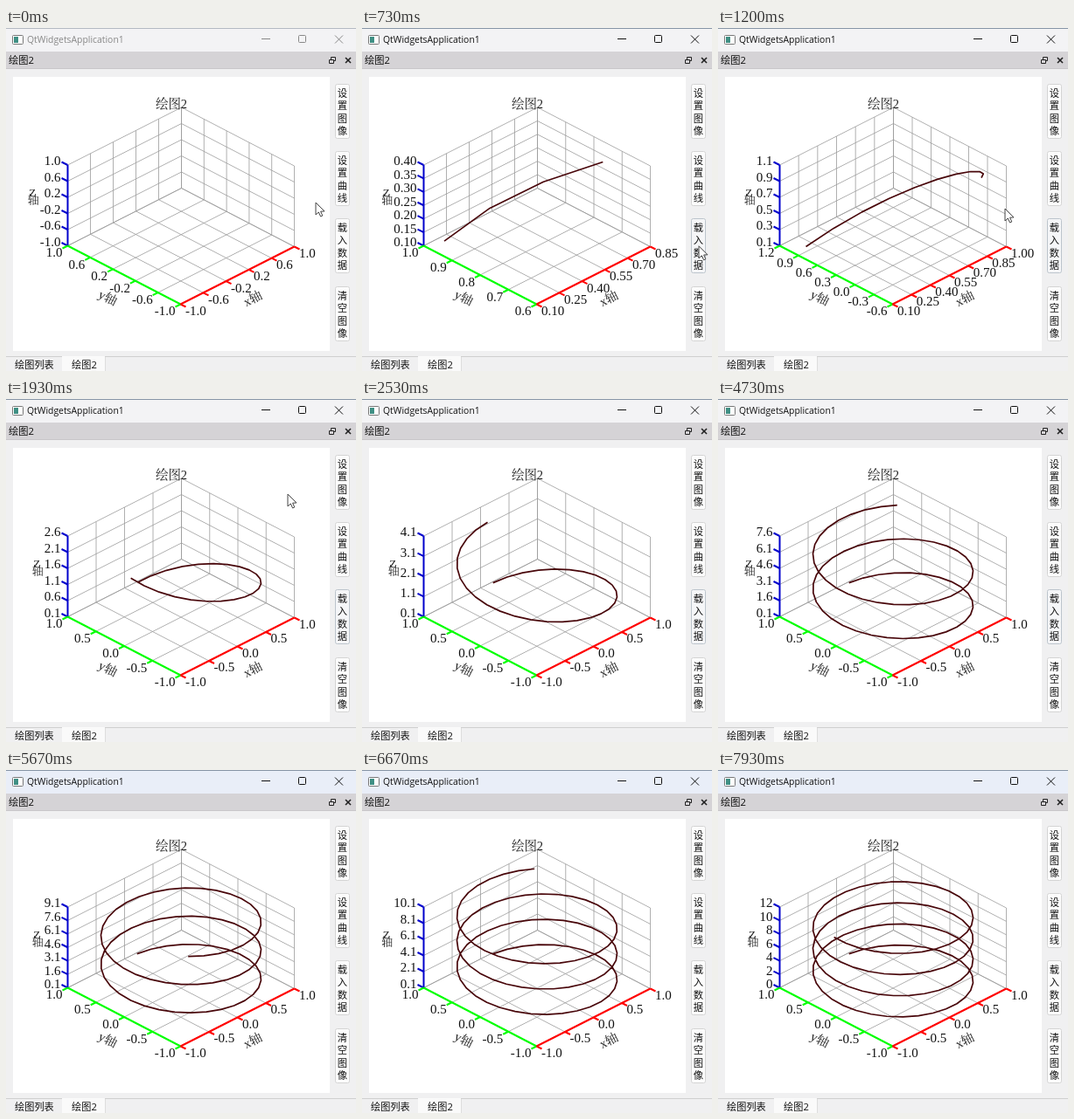
Write an HTML page with a canvas that moves like this. It is 400x393 px and loops after 8000 ms.

```html
<!DOCTYPE html>
<html lang="zh">
<head>
<meta charset="utf-8">
<style>
html, body { margin: 0; width: 100%; height: 100%; overflow: hidden; background: #f0f0f1; }
canvas { display: block; width: 400px; height: 393px; }
</style>
</head>
<body>
<canvas id="stage"></canvas>
<script>
const LOOP = 8000, FRAME = 1000 / 15;
const UI = '"Open Sans", "Noto Sans CJK SC", "Noto Sans CJK", sans-serif';
const SERIF = '"Liberation Serif", "Noto Serif CJK SC", "Noto Sans CJK SC", "Noto Sans CJK", serif';
const canvas = document.getElementById('stage');
const ctx = canvas.getContext('2d');
const dpr = window.devicePixelRatio || 1;
canvas.width = 400 * dpr;
canvas.height = 393 * dpr;

function rect(x, y, w, h, color) {
  ctx.fillStyle = color;
  ctx.fillRect(x, y, w, h);
}

function line(points, color, width = 1) {
  ctx.beginPath();
  points.forEach(p => ctx.lineTo(p[0], p[1]));
  ctx.strokeStyle = color;
  ctx.lineWidth = width;
  ctx.stroke();
}

function text(str, x, y, size, { font = UI, align = 'left', color = '#111', turn = 0 } = {}) {
  ctx.save();
  ctx.translate(x, y);
  ctx.rotate(turn);
  ctx.font = `${size}px ${font}`;
  ctx.textAlign = align;
  ctx.textBaseline = 'middle';
  ctx.fillStyle = color;
  ctx.fillText(str, 0, 0);
  ctx.restore();
}

function box(x, y, w, h, r, fill, stroke) {
  ctx.beginPath();
  ctx.roundRect(x + .5, y + .5, w - 1, h - 1, r);
  ctx.fillStyle = fill;
  ctx.fill();
  ctx.strokeStyle = stroke;
  ctx.lineWidth = 1;
  ctx.stroke();
}

function cross(x, y, r, color, width) {
  line([[x - r, y - r], [x + r, y + r]], color, width);
  line([[x - r, y + r], [x + r, y - r]], color, width);
}

// Fractions along the x, y and z axes to screen
const project = (u, v, w) => [199.5 + 130 * u - 129 * v, 316.5 - 66 * u - 67 * v - 92.5 * w];

// Smallest round scale of 4 to 6 intervals that holds the data
function scale(min, max) {
  const lo = Math.floor(min * 10 + 1e-9) / 10;
  const need = Math.max(max - lo, .01) - 1e-9;
  let best = { span: Infinity };
  for (let e = -3; e < 2; e++)
    for (const m of [1, 1.5, 2, 3, 5])
      for (let n = 4; n < 7; n++) {
        const step = m * 10 ** e, span = n * step;
        if (span >= need && span < best.span - 1e-9) best = { lo, step, n, span };
      }
  return best;
}

function labels({ lo, step, n, span }) {
  const whole = f => [lo, step].every(v => Math.abs(v * f - Math.round(v * f)) < 1e-6);
  const digits = span > 10 || whole(1) ? 0 : whole(10) ? 1 : 2;
  return Array.from({ length: n + 1 }, (_, i) =>
    (Math.round((lo + i * step) * 100) / 100 + 0).toFixed(digits));
}

function drawPlot(count) {
  const data = [];
  for (let k = 1; k <= count; k++)
    data.push([Math.sin(k * .2), Math.cos(k * .2), k * .1]);
  const axes = [0, 1, 2].map(i => {
    if (!count) return { lo: -1, step: .4, n: 5, span: 2 };
    const vals = data.map(p => p[i]);
    return scale(Math.min(...vals), Math.max(...vals));
  });
  const [ax, ay, az] = axes;

  const grid = (a, b) => line([project(...a), project(...b)], '#9c9c9c', .8);
  for (let i = 0; i <= ax.n; i++) {
    const u = i / ax.n;
    grid([u, 0, 0], [u, 1, 0]);
    grid([u, 1, 0], [u, 1, 1]);
  }
  for (let i = 0; i <= ay.n; i++) {
    const v = i / ay.n;
    grid([0, v, 0], [1, v, 0]);
    grid([1, v, 0], [1, v, 1]);
  }
  for (let i = 0; i <= az.n; i++) {
    const w = i / az.n;
    grid([0, 1, w], [1, 1, w]);
    grid([1, 1, w], [1, 0, w]);
  }

  function axis(a, at, color, tick, shift, align) {
    line([project(...at(0)), project(...at(1))], color, 2);
    labels(a).forEach((str, i) => {
      const [x, y] = project(...at(i / a.n));
      line([[x, y], [x + tick[0], y + tick[1]]], color, 2);
      text(str, x + shift[0], y + shift[1], 15, { font: SERIF, align });
    });
  }
  axis(az, w => [0, 1, w], '#00c', [-7, -3.5], [-8, -3.5], 'right');
  axis(ay, v => [0, v, 0], '#0f0', [-6, 3], [-6, 9], 'right');
  axis(ax, u => [u, 0, 0], '#f00', [6, 3], [5.5, 8.5], 'left');

  const curve = data.map(p => project(...p.map((c, i) => (c - axes[i].lo) / axes[i].span)));
  line(curve, '#48060a', 1.7);

  const title = { font: SERIF, align: 'center', color: '#222' };
  text('绘图2', 189, 88, 14.5, title);
  text('x轴', 282.5, 311, 14.5, { ...title, turn: -.47 });
  text('y轴', 116, 310, 14.5, { ...title, turn: .47 });
  ctx.font = `15px ${SERIF}`;
  const zx = 54 - Math.max(...labels(az).map(s => ctx.measureText(s).width));
  text('Z', zx, 189.5, 13, title);
  text('轴', zx + 1, 197.5, 13, title);
}

function drawWindow(active, focus, tinted) {
  rect(0, 0, 400, 393, '#f0f0f1');
  rect(0, 0, 400, 27, tinted ? '#e9eef8' : '#f3f3f5');
  rect(0, 0, 400, 1, active ? '#8795a6' : '#b4b9c2');
  const ink = active ? '#111' : '#888';
  box(7, 8, 13, 11, 1, '#fff', '#777');
  rect(9, 10, 5, 7, '#3f8f84');
  text('QtWidgetsApplication1', 24, 14, 10.4, { color: ink });
  line([[292, 12.5], [302, 12.5]], ink);
  box(334, 8, 9, 9, 1, 'transparent', ink);
  cross(380.5, 13, 4.5, ink, 1);

  rect(0, 27, 400, 20, '#d5d3d6');
  rect(0, 46, 400, 1, '#c8c6c9');
  text('绘图2', 3, 38.5, 11.3);
  box(371, 33, 6, 5, 0, '#d5d3d6', '#222');
  box(369, 36, 6, 5, 0, '#d5d3d6', '#222');
  cross(391, 37, 3, '#222', 1.6);

  rect(8, 56, 362, 314, '#fff');
  ['设置图像', '设置曲线', '载入数据', '清空图像'].forEach((name, i) => {
    const y = 64 + i * 77.4 | 0, lit = focus && i === 2;
    box(376, y, 17, 63, 2, lit ? '#f5f6f8' : '#fcfcfc', lit ? '#bcc4cc' : '#d4d4d4');
    [...name].forEach((ch, j) => text(ch, 384.5, y + 12 + j * 14.5, 11.3, { align: 'center' }));
  });

  rect(0, 376, 400, 1, '#cfcfcf');
  rect(64, 376, 49, 17, '#fafafa');
  rect(113, 377, 1, 16, '#ddd');
  text('绘图列表', 10, 387, 11.2);
  text('绘图2', 75, 387.5, 11.2);
}

// Time, x, y of the pointer tip
const path = [
  [0, 354, 200], [130, 358, 208], [400, 385, 249], [870, 385, 250], [1200, 328, 207],
  [1550, 320, 125], [1730, 321, 107], [1930, 322, 109], [2130, 326, 88], [2450, 336, -18]
];

function drawPointer(t) {
  const i = path.findIndex(p => p[0] > t);
  if (i < 1) return;
  const [a, b] = [path[i - 1], path[i]];
  const f = (t - a[0]) / (b[0] - a[0]), s = f * f * (3 - 2 * f);
  ctx.save();
  ctx.translate(a[1] + (b[1] - a[1]) * s, a[2] + (b[2] - a[2]) * s);
  ctx.beginPath();
  [[0, 0], [0, 14], [3.3, 11], [5.6, 16], [7.8, 15], [5.6, 10.2], [10, 10]].forEach(p => ctx.lineTo(...p));
  ctx.closePath();
  ctx.fillStyle = '#fff';
  ctx.fill();
  ctx.strokeStyle = '#444';
  ctx.lineWidth = 1;
  ctx.stroke();
  ctx.restore();
}

function draw(now) {
  // Screen refreshes at 15 per second, points arrive slightly faster
  const t = Math.floor((now % LOOP + 4) / FRAME) * FRAME;
  const count = Math.max(0, Math.floor(11.5 + (t - 1200) * .0159));
  ctx.setTransform(dpr, 0, 0, dpr, 0, 0);
  ctx.lineJoin = 'round';
  drawWindow(t > 450, t > 330 && t < 4900, t > 4900);
  drawPlot(count);
  drawPointer(t);
}

const start = performance.now();
function tick() {
  draw(performance.now() - start);
  requestAnimationFrame(tick);
}
tick();
</script>
</body>
</html>
```
